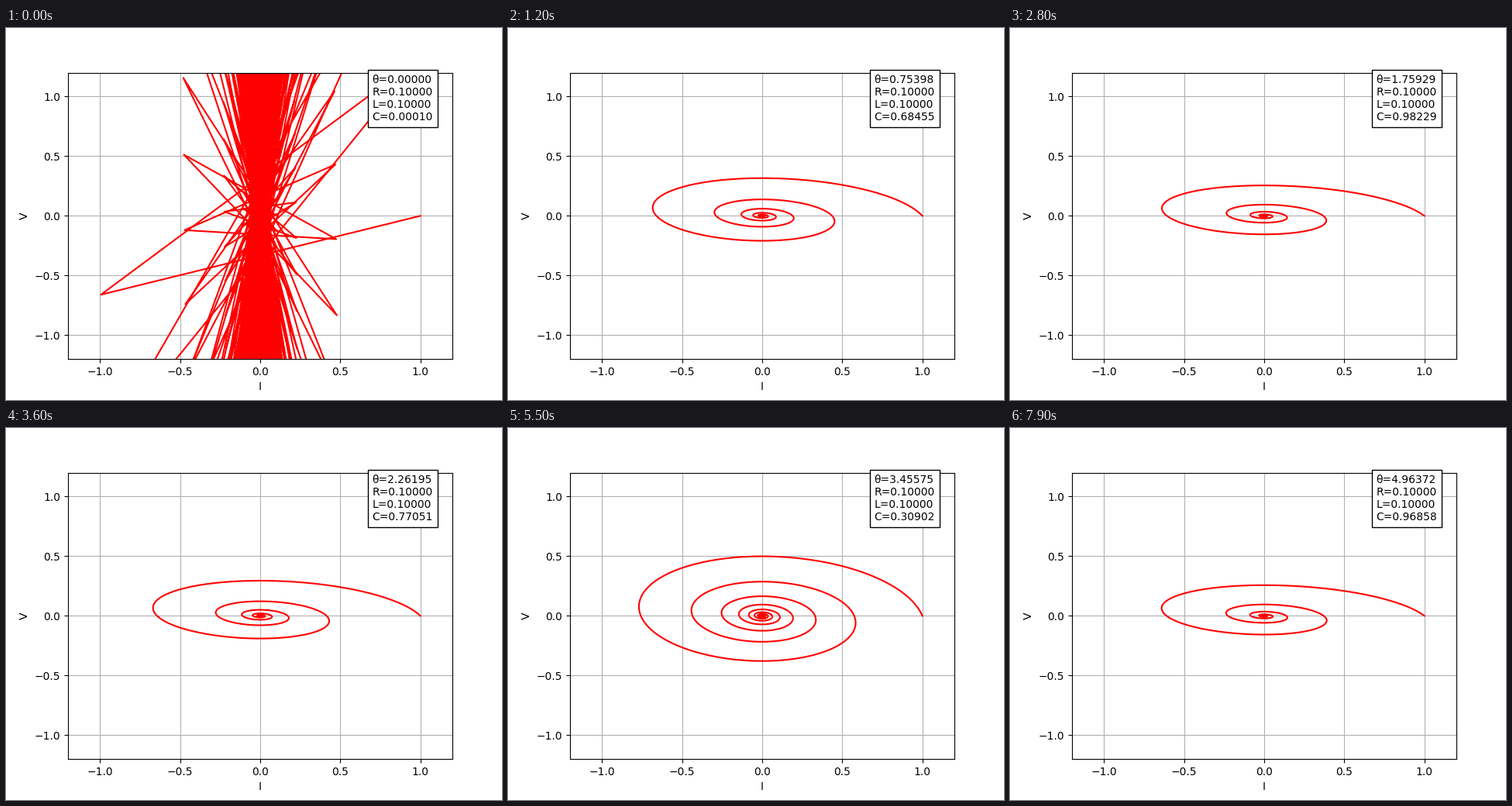
Animation, 640 px wide and 480 px high, one loop 8000 ms. Source, as a matplotlib script:

```python
import numpy as np
import matplotlib.pyplot as plt
from matplotlib.animation import FuncAnimation

R, L = 0.1, 0.1
C_MIN = 1e-4
FRAMES, TURN = 80, 100
t = np.linspace(0, 100, 10000)


def discharge(c):
    """Current and voltage of an underdamped series RLC circuit, I(0)=1, V(0)=0."""
    a = R / (2 * L)
    w = np.sqrt(1 / (L * c) - a * a)
    decay = np.exp(-a * t)
    i = decay * (np.cos(w * t) - a / w * np.sin(w * t))
    v = decay * np.sin(w * t) / (c * w)
    return i, v


fig, ax = plt.subplots(figsize=(6.4, 4.8), dpi=100)
ax.set(xlim=(-1.2, 1.2), ylim=(-1.2, 1.2), xlabel="I", ylabel="V")
ax.set_xticks(np.arange(-1, 1.1, 0.5))
ax.set_yticks(np.arange(-1, 1.1, 0.5))
ax.grid(True)
line, = ax.plot([], [], color="red", lw=1.5)
label = ax.text(0.7, 0.8, "", bbox=dict(facecolor="white", edgecolor="black"))


def update(k):
    theta = 2 * np.pi * k / TURN
    c = max(abs(np.sin(theta)), C_MIN)
    line.set_data(*discharge(c))
    label.set_text(f"θ={theta:.5f}\nR={R:.5f}\nL={L:.5f}\nC={c:.5f}")
    return line, label


anim = FuncAnimation(fig, update, frames=FRAMES, interval=100,
                     repeat=True, repeat_delay=0)
plt.show()
```
